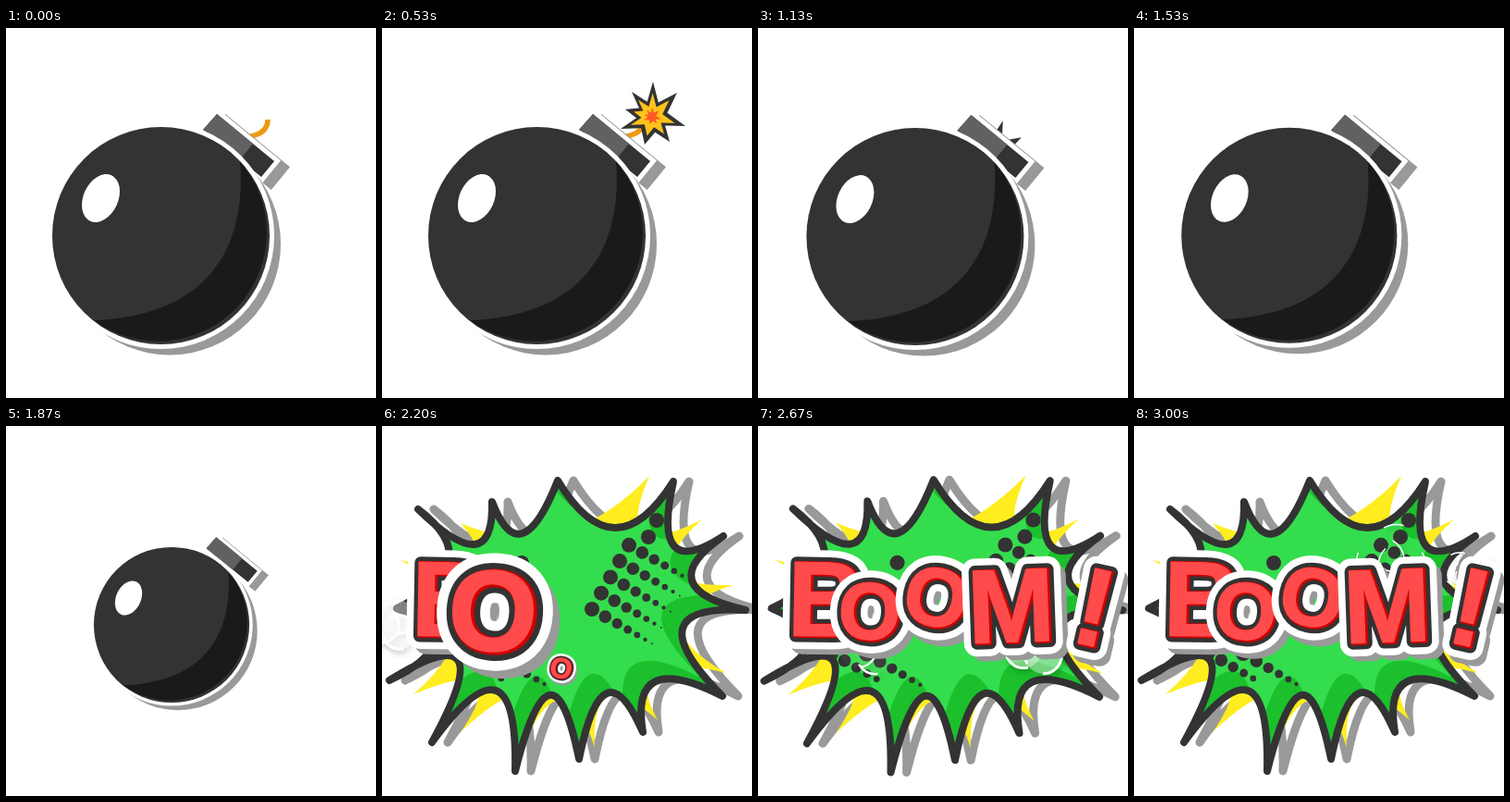
These frames come from a looping animation (400x400 px, 3.07 s). An HTML page:

```html
<!DOCTYPE html>
<html lang="en">
<head>
<meta charset="utf-8">
<title>Boom</title>
<style>
  html, body { margin: 0; width: 100%; height: 100%; overflow: hidden; background: #fff; }
  svg { display: block; width: 100%; height: 100%; }
  text { font: bold 100px "Liberation Sans", Arial, sans-serif; text-anchor: middle; stroke-linejoin: round; }
</style>
</head>
<body>
<svg viewBox="0 0 400 400">
  <defs>
    <path id="capShape" d="M228 93 290 144 276 161 213 110Z"/>
    <clipPath id="burstClip"><path class="burstPath"/></clipPath>
    <filter id="soft" x="-50%" y="-50%" width="200%" height="200%">
      <feDropShadow dx="2" dy="3" stdDeviation="3" flood-opacity=".3"/>
    </filter>
  </defs>

  <g id="bomb">
    <path id="fuse" d="M255 118Q283 117 283 99" pathLength="100" fill="none" stroke="#ef9912" stroke-width="5.5"/>
    <g id="spark">
      <path class="star" fill="#333"/>
      <path class="star" fill="#ffc21a" transform="scale(.68)"/>
      <path class="star" fill="#ff5a26" transform="scale(.27)"/>
    </g>
    <g id="cap">
      <use href="#capShape" x="10" y="7" fill="#999" stroke="#999" stroke-width="10"/>
      <use href="#capShape" fill="#333" stroke="#fff" stroke-width="10"/>
      <use href="#capShape" fill="#333"/>
      <path d="M228 93 267 125 253 142 213 110Z" fill="#616161"/>
    </g>
    <circle cx="177" cy="233.5" r="120" fill="#999"/>
    <circle cx="167.5" cy="224.5" r="122.5" fill="#fff"/>
    <circle cx="167.5" cy="224.5" r="117.5" fill="#333"/>
    <path d="M253 144C258 205 245 310 95 316A117.5 117.5 0 0 0 253 144Z" fill="#1a1a1a"/>
    <ellipse rx="18.7" ry="27.3" transform="translate(102.5 184) rotate(25)" fill="#fff"/>
  </g>

  <g id="explosion">
    <g id="burst" stroke-linejoin="round">
      <path class="burstPath" transform="translate(17)" fill="none" stroke="#999" stroke-width="9"/>
      <path id="flare" fill="#ffed1f"/>
      <path class="burstPath" fill="#1bc02c"/>
      <g clip-path="url(#burstClip)">
        <path class="burstPath" fill="#34dd4d" transform="translate(-6 -6) scale(.95)"/>
        <g id="dots" fill="#333"></g>
      </g>
      <path class="burstPath" fill="none" stroke="#333" stroke-width="8"/>
    </g>
    <g id="smoke" filter="url(#soft)"></g>
    <g id="word" aria-label="BOOM!"></g>
  </g>
</svg>

<script>
const $ = id => document.getElementById(id);
const place = (el, value) => el.setAttribute('transform', value);
const show = (el, on) => el.style.display = on ? '' : 'none';
const clamp = v => Math.max(0, Math.min(1, v));
const fillPaths = (name, d) => document.querySelectorAll('.' + name).forEach(p => p.setAttribute('d', d));

// Linear interpolation through [time, value] pairs.
function track(t, keys) {
  if (t <= keys[0][0]) return keys[0][1];
  for (let i = 1; i < keys.length; i++) {
    const [t0, a] = keys[i - 1], [t1, b] = keys[i];
    if (t <= t1) return a + (b - a) * (t - t0) / (t1 - t0);
  }
  return keys[keys.length - 1][1];
}

// Spikes joined by concave curves; each curve passes through its valley.
function spiky(tips, valleyOf) {
  let d = 'M' + tips[0].slice(0, 2);
  tips.forEach((a, i) => {
    const b = tips[(i + 1) % tips.length];
    const mid = [(a[0] + b[0]) / 2, (a[1] + b[1]) / 2];
    const v = valleyOf(a, mid);
    d += `Q${2 * v[0] - mid[0]} ${2 * v[1] - mid[1]} ${b[0]} ${b[1]}`;
  });
  return d + 'Z';
}

// Tip x, y and the valley that follows it.
const burstTips = [
  [39, 90, 100, 128], [119, 82, 152, 116], [190, 59, 252, 110], [315, 60, 316, 130],
  [369, 119, 335, 167], [393, 199, 325, 219], [368, 292, 296, 276], [282, 331, 243, 289],
  [213, 360, 181, 291], [144, 373, 123, 286], [54, 342, 82, 253], [8, 275, 55, 234],
  [16, 197, 72, 146]
];
const flareTips = [
  [289, 54], [346, 101], [379, 172], [372, 267], [298, 318], [230, 347],
  [160, 330], [85, 331], [34, 290], [20, 145], [85, 105]
];
fillPaths('burstPath', spiky(burstTips, a => a.slice(2)));
$('flare').setAttribute('d', spiky(flareTips, (a, m) => m.map(v => v + (200 - v) * .3)));

const sparkTips = [[1, -38], [27, -26], [36, 10], [19, 27], [-8, 30], [-34, 13], [-29, -8], [-22, -27]];
fillPaths('star', 'M' + sparkTips.map(([x, y], i) => {
  const [nx, ny] = sparkTips[(i + 1) % 8];
  const k = 17 / Math.hypot(x + nx, y + ny);
  return `${x} ${y} ${(x + nx) * k} ${(y + ny) * k}`;
}).join(' ') + 'Z');

// Halftone rows shrink towards the lower right.
function dotRow(x, y, count) {
  let row = '';
  for (let k = 0; k < count; k++)
    row += `<circle cx="${x + 15 * k - .7 * k * k}" cy="${y + 8.5 * k - .38 * k * k}" r="${8 - 1.17 * k}"/>`;
  return row;
}
let dots = dotRow(151, 148, 1) + dotRow(288, 120, 1) + dotRow(297, 102, 1) + dotRow(80, 245, 5) + dotRow(118, 246, 6);
for (let i = 0; i < 5; i++) dots += dotRow(227 + 10 * i, 198 - 17.3 * i, 7);
$('dots').innerHTML = dots;

const letters = [
  { char: 'B', x: 75, y: 188, size: 115, turn: 1, start: 2000 },
  { char: 'O', x: 122, y: 201, size: 87, turn: 3, start: 2067 },
  { char: 'O', x: 194, y: 186, size: 89, turn: 12, start: 2133 },
  { char: 'M', x: 275, y: 195, size: 113, turn: -2, start: 2200 },
  { char: '!', x: 365, y: 197, size: 120, turn: 13, start: 2267 }
];
for (const letter of letters) {
  const layer = (fill, width, dx = 0, dy = 0) =>
    `<text x="${dx}" y="${letter.size * .344 + dy}" style="font-size:${letter.size}px" fill="${fill}" stroke="${fill}" stroke-width="${width}">${letter.char}</text>`;
  letter.el = document.createElementNS('http://www.w3.org/2000/svg', 'g');
  letter.el.innerHTML = layer('#999', 25, 7, 7) + layer('#fff', 28) + layer('#333', 13)
    + layer('#d00000', 4) + layer('#ff4b4b', 1.5, -1.5, -.5);
  $('word').append(letter.el);
}

const puffs = [
  [12, 215, 24, 2067], [85, 143, 28, 2200], [207, 152, 18, 2267], [172, 236, 18, 2267],
  [8, 240, 14, 2267], [120, 240, 24, 2467], [300, 240, 26, 2533], [240, 145, 26, 2667],
  [280, 143, 28, 2733], [362, 156, 20, 2733]
];
function drawSmoke(t) {
  $('smoke').innerHTML = puffs.map(([x, y, r, start]) => {
    const age = (t - start) / 333;
    if (age <= 0 || age >= 1) return '';
    const grow = r * (.6 + .4 * age);
    return [0, 1, 2].map(i => {
      const angle = i * 2.1 + r;
      return `<circle cx="${x + r * .5 * Math.cos(angle)}" cy="${y + r * .4 * Math.sin(angle)}" r="${grow}"
        fill="#fff" fill-opacity="${clamp(1 - age * 1.6)}" stroke="#fff" stroke-width="${3.5 * (1 - age) + .8}"
        stroke-dasharray="${r * (1.6 - age)} ${r * age * 2}" stroke-dashoffset="${r * i}"/>`;
    }).join('');
  }).join('');
}

function drawBomb(t) {
  const shaking = t > 860 && t < 1460;
  const dx = shaking ? 2.4 * Math.cos(Math.PI * (t - 1133) / 133) : 0;
  const dy = shaking ? 3.5 * Math.sin(Math.PI * (t - 1133) / 100 + .29) : 0;
  const shrink = clamp((t - 1467) / 400) ** 2;
  place($('bomb'), `translate(${dx + 208} ${dy + 191}) scale(${1 - .285 * shrink}) translate(-208 -191)`);
  place($('cap'), `translate(${7 * shrink} ${-shrink})`);

  const burn = Math.max(0, (t - 533) / 600);
  const size = track(t, [[267, 0], [333, .5], [467, 1.06], [533, 1], [1133, .94], [1333, .3]]);
  show($('spark'), t > 300 && t < 1330);
  place($('spark'), `translate(${292 - 41 * burn} ${96 + 37 * burn}) rotate(${17 * burn}) scale(${size})`);
  show($('fuse'), burn < 1);
  $('fuse').setAttribute('stroke-dasharray', `${100 * (1 - burn)} 200`);
}

function drawExplosion(t) {
  const size = t < 2200
    ? track(t, [[1933, .35], [2000, .85], [2067, 1.12], [2133, 1.05], [2200, 1]])
    : 1 + .0135 * (1 - Math.cos(2 * Math.PI * (t - 2200) / 400));
  place($('burst'), `translate(212 172) scale(${size}) translate(-212 -172)`);
  for (const { el, x, y, turn, start } of letters) {
    const age = t - start;
    const scale = track(age, [[0, 0], [67, .35], [133, 1.42], [200, 1]]);
    const rise = track(age, [[67, 76], [133, 0]]);
    show(el, age > 10);
    place(el, `translate(${x} ${y + rise}) rotate(${turn}) scale(${scale})`);
  }
  drawSmoke(t);
}

const origin = performance.now();
function tick(now) {
  // Fifteen poses per second.
  const time = Math.max(0, now - origin) % 3070;
  const t = Math.min(45, Math.floor((time + 4) * .015)) / .015;
  const exploded = t > 1900;
  show($('bomb'), !exploded);
  show($('explosion'), exploded);
  exploded ? drawExplosion(t) : drawBomb(t);
  requestAnimationFrame(tick);
}
tick(origin);
</script>
</body>
</html>
```
